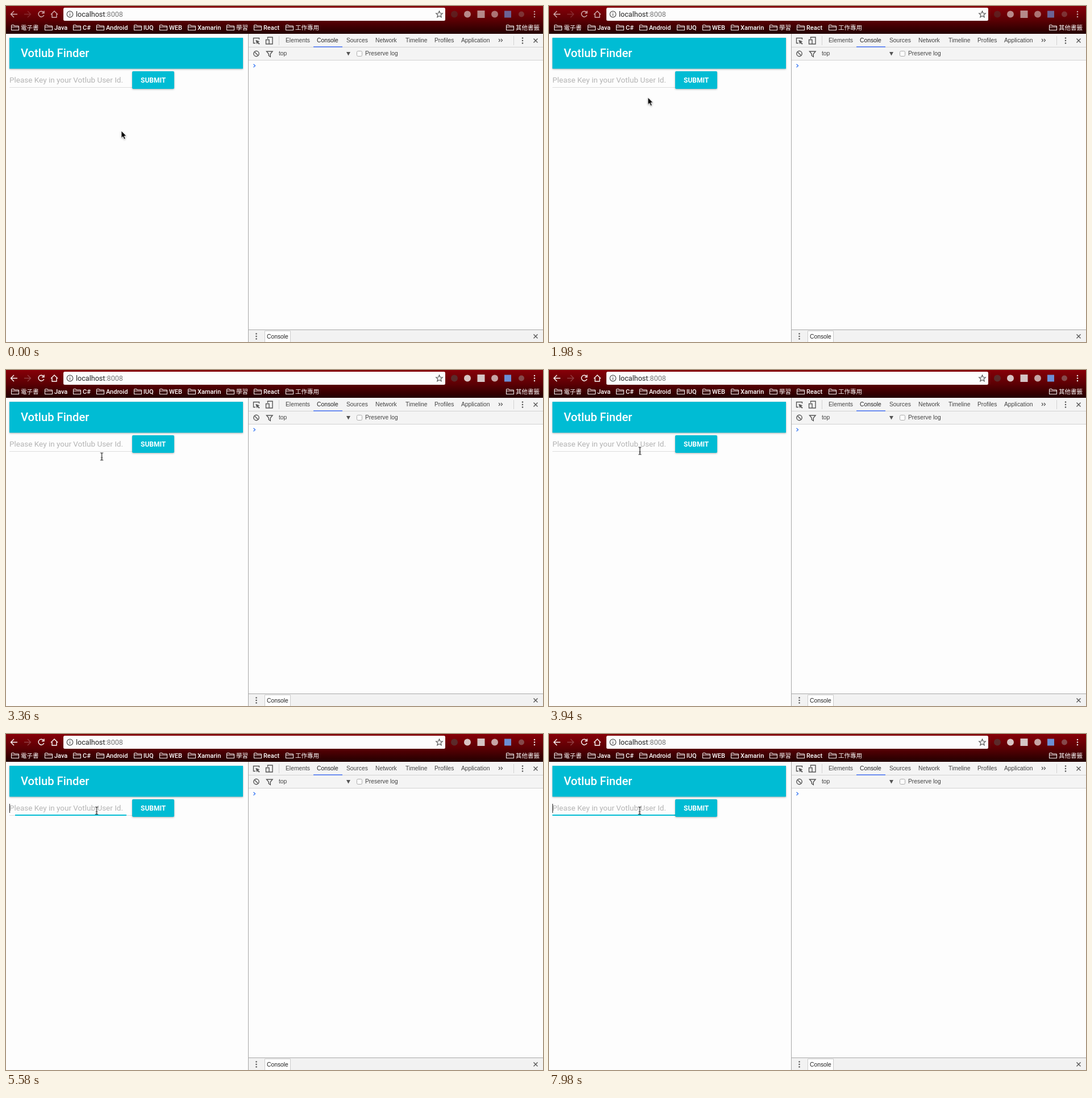
Animation, 945 px wide and 592 px high, one loop 8000 ms. Source, as an HTML page:

```html
<!DOCTYPE html>
<html lang="en">
<head>
<meta charset="utf-8">
<title>Finder demo</title>
<style>
  html, body { margin: 0; width: 100%; height: 100%; overflow: hidden; background: #fdfdfd; }
  svg { display: block; }
  text { font-family: Roboto, "Noto Sans CJK TC", "Noto Sans CJK JP", sans-serif; white-space: pre; }
  .line { fill: none; stroke-width: 1.4; }
  .mark { font-size: 11px; font-weight: 500; fill: #fff; }
  .cjk { font-size: 10.5px; }
  .tools text { font: 10.3px "Liberation Sans", Arial, sans-serif; fill: #444; }
  .tools .on { fill: #222; }
  .raised { filter: drop-shadow(0 1px 1.5px rgba(0, 0, 0, .3)); }
</style>
</head>
<body>
<svg width="945" height="592" viewBox="0 0 945 592">
  <defs>
    <linearGradient id="bar" x2="0" y2="1">
      <stop stop-color="#870008"/>
      <stop offset=".5" stop-color="#5c0004"/>
      <stop offset="1" stop-color="#220000"/>
    </linearGradient>
    <path id="folder" class="line" stroke="#eee" style="stroke-width:1.1" d="M.5 9.5V1.5Q.5.5 1.5.5H4.5L6 2H12.5Q13.5 2 13.5 3V9.5ZM.5 4H13.5"/>
    <g id="dots"><circle r="1.25" cy="-4.5"/><circle r="1.25"/><circle r="1.25" cy="4.5"/></g>
    <path id="cross" class="line" d="M-3.5-3.5 3.5 3.5M3.5-3.5-3.5 3.5"/>
  </defs>

  <rect width="945" height="592" fill="#fdfdfd"/>

  <!-- Browser chrome -->
  <rect width="945" height="49" fill="url(#bar)"/>
  <g id="controls">
    <g class="line" stroke="#fff">
      <path d="M20 14.5H9M14 9 8.500 14.500 14 20"/>
      <path d="M32 14.500H43M38 9 43.500 14.500 38 20" opacity=".25"/>
      <path d="M66 11A5 5 0 1 0 66.800 16M67 8.500V12.500H63"/>
      <path d="M79 15 85 9 91 15M81 14V20H89V14"/>
    </g>
    <circle cx="789" cy="14.500" r="6" fill="#5b2a2a"/>
    <circle cx="812" cy="14.500" r="6" fill="#d9c4c4"/>
    <rect x="829.500" y="8" width="13" height="13" fill="#d5c5c5"/>
    <circle cx="860" cy="14.500" r="6" fill="#c7a5a5"/>
    <rect x="877" y="8.500" width="12" height="12" fill="#6c8fd5"/>
    <circle cx="907" cy="14.500" r="5" fill="#85494b"/>
    <use href="#dots" x="930" y="14.500" fill="#eee"/>
  </g>
  <rect x="101" y="3" width="672" height="23" rx="2.500" fill="#fdfdfd"/>
  <g class="line" stroke="#555" style="stroke-width:1.2">
    <circle cx="112.500" cy="14.500" r="5.300"/>
    <path d="M112.500 13.500V17.500M112.500 11V12.300"/>
    <path d="M762.500 9 764.100 12.800 768.200 13.100 765.100 15.800 766.100 19.800 762.500 17.600 758.900 19.800 759.900 15.800 756.800 13.100 760.900 12.800Z"/>
  </g>
  <text x="123" y="19" font-size="12.6" fill="#222">localhost<tspan fill="#777">:8008</tspan></text>
  <g id="bookmarks"></g>

  <!-- Page -->
  <rect class="raised" x="6" y="56" width="411" height="54.500" fill="#00bcd4"/>
  <text x="26" y="90" font-size="20.2" font-weight="500" fill="#fff">Votlub Finder</text>
  <text x="6" y="135" font-size="13.5" fill="#b4b4b4">Please Key in your Votlub User Id.</text>
  <rect x="6" y="143" width="216" height="1" fill="#dedede"/>
  <rect id="underline" x="6" y="142" width="216" height="2" fill="#00bcd4"/>
  <rect id="caret" x="6" y="123" width="1" height="16" fill="#222"/>
  <rect class="raised" x="222" y="115" width="74" height="31" rx="2" fill="#00bcd4"/>
  <text x="237" y="135" font-size="12" font-weight="700" fill="#fff">SUBMIT</text>

  <!-- Developer tools -->
  <g class="tools">
    <rect x="427" y="49" width="518" height="46" fill="#f4f4f4"/>
    <rect x="427" y="570" width="518" height="22" fill="#f2f2f2"/>
    <path d="M427 72.500H945M427 95.500H945M480.500 53V69M893.500 53V69" stroke="#d2d2d2"/>
    <path d="M427 570.500H945M426.500 49V592" stroke="#a8a8a8"/>
    <rect x="541" y="71" width="51" height="2" fill="#6d8ef0"/>
    <g id="tabs"></g>
    <g class="line" stroke="#555">
      <path d="M439 65.500H435.500V56.500H445.500V59"/>
      <path d="M439.500 60 446 62.500 443.500 63.500 446.500 66.500 445 67.500 442.500 64.700 441.500 67Z" fill="#555" style="stroke-width:.4"/>
      <path d="M460.500 58V55H469V67H463.500M457.500 59.500H463V67H457.500Z"/>
      <circle cx="440.500" cy="84" r="4.700"/>
      <path d="M437.300 80.800 443.700 87.200"/>
      <path d="M458.500 80H469L465.300 84.500V89.500L462.300 87.500V84.500Z"/>
      <path d="M867 58 869.500 60.500 867 63M871 58 873.500 60.500 871 63" style="stroke-width:1.200"/>
      <use href="#cross" x="932" y="61"/>
      <use href="#cross" x="932" y="582"/>
    </g>
    <use href="#dots" x="909" y="61" fill="#555"/>
    <use href="#dots" x="440.500" y="582" fill="#555"/>
    <text x="480" y="87">top</text>
    <path d="M599 81H606L602.500 87.500Z" fill="#555"/>
    <rect x="617.500" y="79.500" width="9" height="9" rx="2" fill="#fff" stroke="#aaa"/>
    <text x="632" y="87">Preserve log</text>
    <path class="line" d="M435.500 102.500 438.500 105.300 435.500 108" stroke="#3f7df5"/>
    <path d="M455.500 592V572.500H500.500V592" fill="#fff" stroke="#ccc"/>
    <text class="on" x="459" y="586">Console</text>
  </g>

  <!-- Pointer -->
  <g id="pointer">
    <path id="arrow" class="raised" d="M0 0V12.500L2.800 9.900 5 14.800 7.200 13.800 5 9.100H8.800Z" fill="#000" stroke="#fff" stroke-width=".8"/>
    <path id="beam" class="line" style="stroke-width:1.200" stroke="#222" d="M-2.500-6.500Q0-6.500 0-5Q0-6.500 2.500-6.500M0-5V5M-2.500 6.500Q0 6.500 0 5Q0 6.500 2.500 6.500M-1.500 2H1.500"/>
  </g>
</svg>
<script>
const LOOP = 8000;
const WAKE = 3320;   // window becomes active, pointer enters the field
const FOCUS = 5380;
const BLINK = 610;
const $ = id => document.getElementById(id);

const bookmarks = [
  [9, '電子書'], [68, 'Java'], [118, 'C#'], [159, 'Android'], [225, 'lUQ'], [270, 'WEB'],
  [320, 'Xamarin'], [388, '學習'], [436, 'React'], [492, '工作專用'], [880, '其他書籤']
];
$('bookmarks').innerHTML = bookmarks.map(([x, name]) =>
  `<use href="#folder" x="${x}" y="33"/>
   <text class="mark ${name.charCodeAt(0) > 255 ? 'cjk' : ''}" x="${x + 17}" y="41.5">${name}</text>`).join('');

const tabs = [
  [492, 'Elements'], [547, 'Console'], [599, 'Sources'], [650, 'Network'],
  [703, 'Timeline'], [754, 'Profiles'], [801, 'Application']
];
$('tabs').innerHTML = tabs.map(([x, name]) =>
  `<text class="${name === 'Console' ? 'on' : ''}" x="${x}" y="64">${name}</text>`).join('');

// Each step is [ms, value, easing towards the next step].
function play(id, prop, steps, easing = 'linear') {
  const last = steps[steps.length - 1];
  const frames = [...steps, [LOOP, last[1]]].map(([ms, value, ease = easing]) =>
    ({ offset: ms / LOOP, [prop]: value, easing: ease }));
  $(id).animate(frames, { duration: LOOP, iterations: Infinity });
}
const toggle = (id, steps) => play(id, 'opacity', steps, 'steps(1, end)');

const path = [
  [0, 203, 220], [420, 194, 196], [820, 182, 170], [1560, 173, 160], [1980, 174, 161],
  [2380, 218, 222], [2560, 231, 214], [2800, 232, 195], [3080, 200, 168], [WAKE, 170, 154],
  [3600, 160, 143], [4180, 160, 142], [4500, 159.5, 135]
];
play('pointer', 'transform', path.map(([ms, x, y]) => [ms, `translate(${x}px, ${y}px)`]));
toggle('arrow', [[0, 1], [WAKE, 0]]);
toggle('beam', [[0, 0], [WAKE, 1]]);
toggle('controls', [[0, .7], [WAKE, 1]]);

$('underline').style.transformOrigin = '114px 143px';
play('underline', 'transform', [
  [0, 'scaleX(0)'],
  [FOCUS, 'scaleX(0)', 'cubic-bezier(.23, 1, .32, 1)'],
  [FOCUS + 540, 'scaleX(1)']
]);
toggle('caret', [[0, 0], ...[0, 1, 2, 3, 4].map(i => [FOCUS + i * BLINK, 1 - i % 2])]);
</script>
</body>
</html>
```
